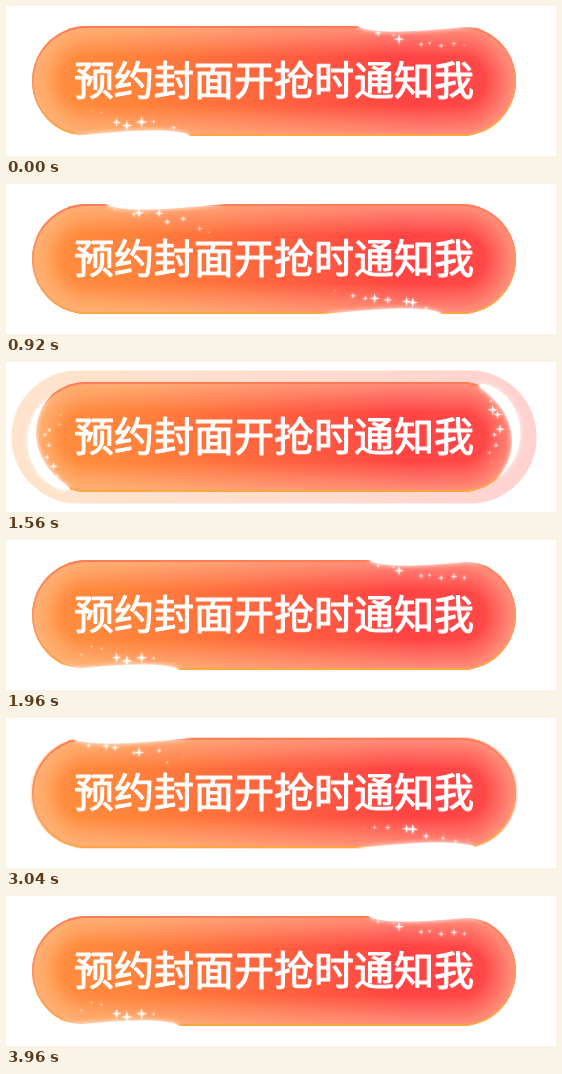
An HTML page with a canvas that plays this animation: 550 by 150 pixels, repeating every 4 s.

```html
<!DOCTYPE html>
<html lang="zh-CN">
<head>
<meta charset="utf-8">
<style>
html, body { margin: 0; width: 100%; height: 100%; overflow: hidden; background: #fff; }
canvas { display: block; }
</style>
</head>
<body>
<canvas id="stage" width="550" height="150"></canvas>
<script>
const ctx = document.getElementById('stage').getContext('2d');
const LOOP = 4000, STEP = 40;
const CX = 268, CY = 75, HALF = 187, R = 55;
const STRAIGHT = HALF * 2, ARC = Math.PI * R, PERIMETER = 2 * (STRAIGHT + ARC);
const TAIL = 118, SPARKLES = 84, GLOW_STEPS = 26;

const clamp = x => Math.min(1, Math.max(0, x));
const smooth = x => (x = clamp(x), x * x * (3 - 2 * x));
const random = n => {
  const v = Math.sin(n * 127.1 + 11.7) * 43758.5453;
  return v - Math.floor(v);
};

// Point on the outline, counterclockwise from the top right, moved inwards by inset.
function outline(distance, inset = 0) {
  let s = ((distance % PERIMETER) + PERIMETER) % PERIMETER;
  const side = s < PERIMETER / 2 ? 1 : -1;
  s %= PERIMETER / 2;
  const r = R - inset;
  let x = HALF - s, y = -r;
  if (s > STRAIGHT) {
    const angle = (s - STRAIGHT) / R;
    x = -HALF - r * Math.sin(angle);
    y = -r * Math.cos(angle);
  }
  return [CX + side * x, CY + side * y];
}

function pill(growX = 0, growY = growX) {
  ctx.beginPath();
  ctx.roundRect(CX - HALF - R - growX, CY - R - growY,
    2 * (HALF + R + growX), 2 * (R + growY), R + growY);
}

function gradient(x0, y0, x1, y1, ...stops) {
  const g = ctx.createLinearGradient(x0, y0, x1, y1);
  stops.forEach(([at, color]) => g.addColorStop(at, color));
  return g;
}

const bodyFill = gradient(45, 125, 480, 15,
  [0, '#ff9040'], [.2, '#ff833b'], [.5, '#ff633f'], [.8, '#ff4344'], [1, '#ff4a48']);
const haloFill = gradient(20, 140, 500, 20, [0, '#ffa04a'], [.5, '#ff8650'], [1, '#ff6058']);
const edgeFill = gradient(0, 20, 0, 130, [0, '#ff7c52'], [.6, '#ff9a60'], [1, '#ffa63e']);

function drawHalo(phase) {
  const grow = smooth((phase - 900) / 900);
  if (!grow || phase >= 1960) return;
  ctx.globalAlpha = .28 * Math.min(1, .2 + (1960 - phase) / 500);
  ctx.fillStyle = haloFill;
  pill(25 * grow, 14 * grow);
  ctx.fill();
  ctx.globalAlpha = 1;
}

function drawButton() {
  ctx.save();
  pill();
  ctx.fillStyle = bodyFill;
  ctx.fill();
  ctx.clip();
  // Overlapping strokes build up an inner glow that fades towards the middle.
  ctx.strokeStyle = 'rgba(255,208,165,.027)';
  for (let i = 1; i <= GLOW_STEPS; i++) {
    ctx.lineWidth = 60 * (i / GLOW_STEPS) ** 1.3;
    ctx.stroke();
  }
  ctx.strokeStyle = edgeFill;
  ctx.lineWidth = 4;
  ctx.stroke();
  ctx.restore();
}

function drawStreak(head) {
  const halfWidth = d => 5.5 * Math.sin(Math.PI * (d / TAIL) ** .6);
  ctx.save();
  ctx.fillStyle = ctx.shadowColor = '#fff';
  ctx.shadowBlur = 5;
  ctx.beginPath();
  for (let d = 0; d <= TAIL; d += 2) ctx.lineTo(...outline(head - d, halfWidth(d)));
  for (let d = TAIL; d >= 0; d -= 2) ctx.lineTo(...outline(head - d, -halfWidth(d)));
  ctx.fill();
  ctx.restore();
}

function drawStar(x, y, size) {
  ctx.beginPath();
  for (let i = 0; i < 8; i++) {
    const r = i % 2 ? size * .24 : size, a = i * Math.PI / 4;
    ctx.lineTo(x + r * Math.cos(a), y + r * Math.sin(a));
  }
  ctx.fill();
}

function drawSparkles(head) {
  ctx.save();
  ctx.fillStyle = '#fff';
  ctx.shadowColor = 'rgba(255,255,255,.7)';
  ctx.shadowBlur = 3;
  for (let i = 0; i < SPARKLES; i++) {
    const start = i * PERIMETER / SPARKLES + 10 * random(i);
    const d = (((head - start) % PERIMETER) + PERIMETER) % PERIMETER;
    if (d > 125) continue;
    const inset = 3 + d * (.1 + .14 * random(i + 100)) + 4 * random(i + 200);
    const life = Math.sin(Math.PI * (d / 125) ** .7);
    ctx.globalAlpha = Math.min(1, life * 1.4);
    drawStar(...outline(start, inset), (2.2 + 4 * random(i + 300)) * life);
  }
  ctx.restore();
}

function drawLabel() {
  const label = '预约封面开抢时通知我';
  ctx.font = '500 40px "Noto Sans CJK SC", "Noto Sans CJK", sans-serif';
  ctx.textAlign = 'center';
  ctx.lineJoin = 'round';
  ctx.lineWidth = 1.1;
  ctx.fillStyle = ctx.strokeStyle = '#fff';
  ctx.fillText(label, CX, 89);
  ctx.strokeText(label, CX, 89);
}

function draw(now) {
  const t = Math.floor(now % LOOP / STEP) * STEP;
  ctx.fillStyle = '#fff';
  ctx.fillRect(0, 0, 550, 150);
  drawHalo(t % (LOOP / 2));
  drawButton();
  const head = 103 + PERIMETER * t / LOOP;
  for (const h of [head, head + PERIMETER / 2]) {
    drawStreak(h);
    drawSparkles(h);
  }
  drawLabel();
  requestAnimationFrame(draw);
}
requestAnimationFrame(draw);
</script>
</body>
</html>
```
